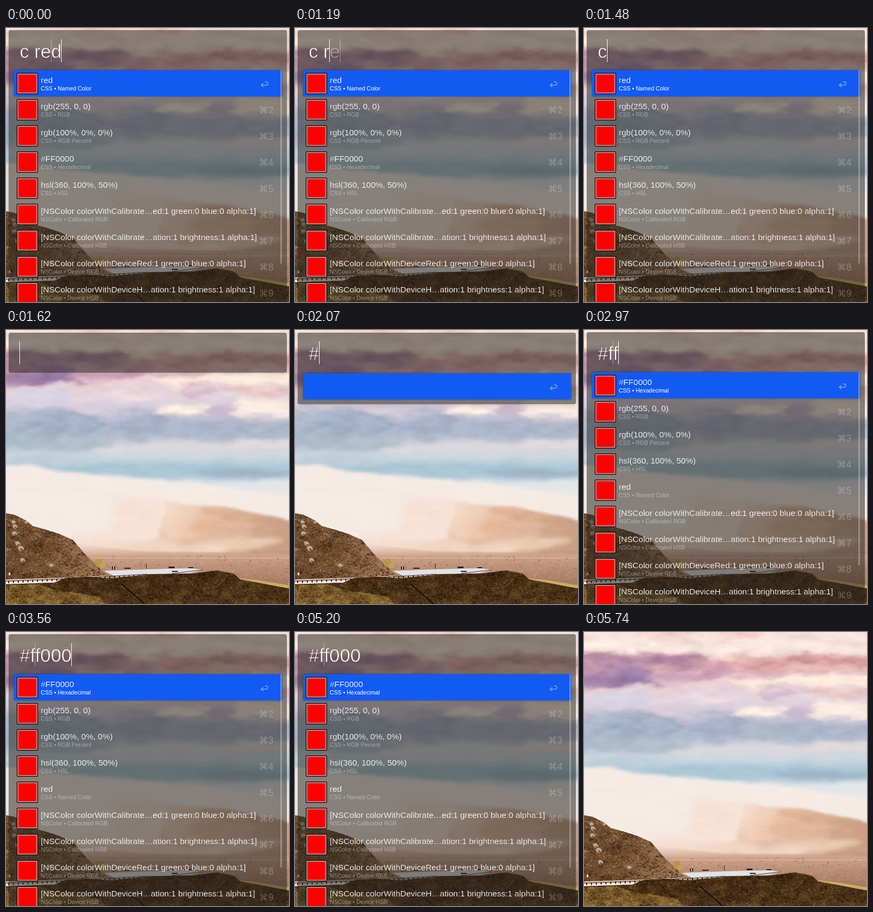
An HTML page with a canvas that plays this animation: 529x513 px, repeating every 5.84 s.

```html
<!DOCTYPE html>
<html lang="en">
<head>
<meta charset="utf-8">
<title>Color search</title>
<style>
html, body { margin: 0; width: 100%; height: 100%; overflow: hidden; background: #f4ebe5; }
canvas { display: block; }
</style>
</head>
<body>
<canvas id="stage" width="529" height="513"></canvas>
<script>
const W = 529, H = 513, LOOP = 5840;
const FONT = '"Liberation Sans", Arial, sans-serif';
const QUERY_X = 25.4, QUERY_SIZE = 35.3;

function layer() {
  const c = document.createElement('canvas');
  c.width = W;
  c.height = H;
  return c.getContext('2d');
}
const ctx = document.getElementById('stage').getContext('2d');
const ink = layer();

// ---------- seeded noise ----------
let seed = 7;
const rnd = () => (seed = (seed * 16807) % 2147483647) / 2147483647;
const between = (a, b) => a + (b - a) * rnd();
const clamp = (v, a, b) => Math.min(b, Math.max(a, v));
const lattice = Float32Array.from({ length: 4096 }, rnd);

function noise(x, y) {
  const i = Math.floor(x), j = Math.floor(y);
  const ease = t => t * t * (3 - 2 * t);
  const u = ease(x - i), v = ease(y - j);
  const at = (a, b) => lattice[(a & 63) + 64 * (b & 63)];
  const mix = row => at(i, row) + (at(i + 1, row) - at(i, row)) * u;
  return mix(j) + (mix(j + 1) - mix(j)) * v;
}
// centred on zero, about -0.5 to 0.5
function fbm(x, y) {
  let sum = 0;
  for (let o = 0, a = 0.53; o < 4; o++, a /= 2) {
    sum += a * (noise(x, y) - 0.5);
    x = x * 2 + 11.3;
    y = y * 2 + 5.7;
  }
  return sum;
}

// ---------- landscape ----------
// Ruffle soft colours into cloud: shift each pixel and shade it by noise.
function ruffle(g) {
  const from = g.getImageData(0, 0, W, H);
  const to = g.createImageData(W, H);
  for (let y = 0; y < H; y++) for (let x = 0; x < W; x++) {
    const reach = y < 180 ? 1 : clamp(1 - (y - 180) / 100, 0.3, 1);
    const sx = clamp(Math.round(x + 60 * reach * fbm(x / 45, y / 22)), 0, W - 1);
    const sy = clamp(Math.round(y + 30 * reach * fbm(x / 50 + 30, y / 24 + 9)), 0, H - 1);
    const s = 4 * (sy * W + sx), d = 4 * (y * W + x);
    const rgb = from.data.subarray(s, s + 3);
    const chroma = Math.max(...rgb) - Math.min(...rgb);
    const shade = chroma * reach * 0.9 * fbm(x / 26 + 17, y / 11 + 40);
    for (let k = 0; k < 3; k++) to.data[d + k] = rgb[k] + shade;
    to.data[d + 3] = 255;
  }
  g.putImageData(to, 0, 0);
}

function paintScene() {
  const g = layer();

  const blend = (x0, y0, x1, y1, stops) => {
    const grad = g.createLinearGradient(x0, y0, x1, y1);
    stops.forEach(([at, color]) => grad.addColorStop(at, color));
    return grad;
  };
  const shape = (points, fill, blur = 0) => {
    g.filter = blur ? `blur(${blur}px)` : 'none';
    g.fillStyle = fill;
    g.beginPath();
    points.split(' ').forEach(p => g.lineTo(...p.split(',')));
    g.fill();
    g.filter = 'none';
  };
  const blob = (x, y, rx, ry, color, alpha = 0.8, tilt = 0) => {
    g.globalAlpha = alpha;
    g.fillStyle = color;
    g.beginPath();
    g.ellipse(x, y, rx, ry, tilt, 0, 7);
    g.fill();
    g.globalAlpha = 1;
  };
  // clustered grain over the shape drawn last; colours run dark to light
  const grain = (n, x0, y0, x1, y1, colors) => {
    g.save();
    g.clip();
    for (let i = 0; i < n; i++) {
      const x = between(x0, x1), y = between(y0, y1);
      const tone = clamp(0.5 + 1.6 * fbm(x / 16, y / 10) + between(-0.4, 0.4), 0, 0.99);
      blob(x, y, between(0.8, 2), between(0.6, 1.3), colors[Math.floor(tone * colors.length)],
        between(0.35, 0.8), between(-0.5, 0.8));
    }
    g.restore();
  };

  g.fillStyle = blend(0, 0, 0, 320, [
    [0, '#f8e6dd'], [0.05, '#f6dfd6'], [0.1, '#f9e7dc'], [0.14, '#eccbc4'],
    [0.18, '#d9aab0'], [0.24, '#deb8c0'], [0.3, '#ead0d2'], [0.4, '#e3d5de'],
    [0.5, '#cdc8d6'], [0.57, '#afb8ca'], [0.63, '#b3bdcd'], [0.68, '#d6d5db'],
    [0.74, '#cdd8df'], [0.8, '#b2cad7'], [0.85, '#b5cbd7'], [0.9, '#e0e5e7'], [1, '#f4ebe5']]);
  g.fillRect(0, 0, W, H);

  g.filter = 'blur(4px)';
  blob(200, 3, 120, 5, '#efc5ba');
  blob(305, 9, 30, 6, '#e6b0ac', 0.7);
  blob(400, 31, 190, 11, '#fbe9df');
  blob(80, 25, 140, 9, '#faebe2', 0.95);
  blob(70, 54, 110, 11, '#ad84a2');
  blob(185, 54, 60, 11, '#a87f9e');
  blob(50, 82, 85, 16, '#9d7ba6');
  blob(95, 92, 50, 11, '#9373a2');
  blob(190, 85, 75, 12, '#c59ab2', 0.7);
  blob(395, 57, 190, 8, '#d79a99');
  blob(440, 70, 110, 6, '#e9b9a8');
  blob(245, 78, 30, 14, '#cf9db1', 0.7);
  blob(320, 98, 48, 9, '#fde8da', 0.95);
  blob(450, 93, 105, 12, '#ffeede', 0.95);
  blob(470, 115, 80, 5, '#ecc0b4');
  blob(350, 115, 32, 8, '#cdb0c8');
  blob(55, 128, 65, 17, '#d8d2e3');
  blob(130, 152, 50, 9, '#dfcfdc');
  blob(235, 126, 35, 8, '#f3e4e8');
  blob(335, 152, 52, 12, '#fff0e3', 0.95);
  blob(490, 145, 75, 19, '#fdeee2', 0.95);
  blob(405, 154, 32, 13, '#cab4cb');
  blob(95, 175, 80, 24, '#a2b0c6');
  blob(20, 180, 50, 24, '#a6b4c8');
  blob(245, 178, 62, 22, '#a3adc6');
  blob(410, 189, 160, 11, '#adb7cb');
  blob(60, 214, 150, 13, '#a7b9ca');
  blob(330, 221, 130, 8, '#dcd9de');
  blob(485, 216, 70, 7, '#e6dcdc');
  blob(195, 225, 30, 5, '#e2dde0');
  blob(70, 240, 110, 7, '#bccfda');
  blob(290, 262, 190, 11, '#a7c6d5');
  blob(445, 268, 92, 8, '#9db2c5', 0.9);
  blob(460, 292, 80, 7, '#e2e7ea');
  g.filter = 'none';

  shape('-20,253 40,253 110,265 200,273 320,283 420,293 550,318 550,530 -20,530', '#f4ebe5', 3);
  shape('200,318 250,314 300,322 310,430 130,430 105,385 200,375', '#f7e2d5', 6);
  shape('296,322 345,327 400,329 450,340 500,351 550,362 550,470 130,470 150,410 285,392',
    blend(300, 320, 420, 450, [[0, '#f5ddcd'], [0.4, '#e9c4ab'], [0.8, '#dcb49c'], [1, '#c79d85']]), 2);
  g.filter = 'blur(5px)';
  blob(430, 350, 70, 10, '#d3a27f', 0.6, 0.2);
  blob(375, 368, 35, 14, '#deb08f', 0.6);
  blob(500, 380, 42, 15, '#d4a68a', 0.6, 0.2);
  blob(430, 402, 90, 12, '#f1d3bf', 0.8, -0.1);
  blob(350, 410, 70, 10, '#f3d8c7', 0.8);
  blob(240, 402, 80, 10, '#f4dacb', 0.7);
  g.filter = 'none';
  ruffle(g);

  shape('120,398 180,406 260,415 400,416 529,420 529,482 150,482',
    blend(0, 400, 0, 470, [[0, 'rgba(215,176,156,0)'], [0.35, '#cba28a'], [1, '#a87a62']]), 1);
  grain(900, 140, 422, W, 475, ['#9a6d55', '#b58670', '#c29a84', '#d0a892']);
  g.fillStyle = 'rgba(236,208,188,.6)';
  g.fillRect(160, 426, W - 160, 1.2);

  // near hill on the left
  shape('0,343 16,346 38,357 50,367 75,374 100,382 125,393 136,406 152,424 175,446 192,462 0,472',
    blend(0, 350, 150, 470, [[0, '#6d4c2f'], [0.5, '#6f4c30'], [1, '#a37a5b']]));
  grain(4200, 0, 343, 192, 470, ['#2e1c0e', '#402a16', '#543a20', '#73512f', '#8f6a48', '#b08a66']);
  [[14, 360, 4], [17, 368, 5], [16, 381, 5], [22, 400, 5], [28, 409, 6], [31, 431, 5], [38, 360, 3], [85, 441, 4]]
    .forEach(([x, y, r]) => {
      blob(x, y, r, r * 0.8, '#cfbeac', 0.8, 0.6);
      blob(x + 2, y + 3, r * 0.7, r * 0.3, '#5b4230', 0.8, 0.6);
    });

  // road and lay-by
  shape('0,467 100,464 185,460 195,463 120,468 0,472', '#dccbba');
  blob(173, 436, 8, 8, '#b39442', 0.75);
  blob(180, 441, 5, 5, '#c7a655', 0.7);
  shape('183,451 235,449 300,447 345,446 370,449 345,455 262,459 205,462', '#dfe3e6');
  g.strokeStyle = '#3a2a20';
  g.lineWidth = 1.2;
  g.beginPath();
  g.moveTo(0, 470);
  g.lineTo(110, 466);
  g.lineTo(265, 457);
  g.moveTo(310, 456);
  g.lineTo(368, 449);
  g.stroke();
  g.fillStyle = '#2b1d14';
  for (let x = 4; x < 265; x += 9) g.fillRect(x, 470 - x * 0.046, 2, 4);
  [[198, 443, 6, 5], [221, 445, 12, 2], [304, 443, 11, 3], [341, 444, 9, 2], [310, 451, 11, 2], [262, 437, 1, 10]]
    .forEach(r => g.fillRect(...r));
  g.fillStyle = '#f3ebe2';
  g.fillRect(200, 444, 2, 3);
  g.fillRect(5, 454, 3, 5);

  // foreground scrub
  shape('430,464 470,468 529,478 529,490 430,474', '#c9ad62');
  shape('0,476 90,473 112,464 150,462 200,465 270,457 350,456 372,453 395,450 425,456 438,467 529,484 529,513 0,513',
    blend(0, 455, 0, H, [[0, '#452c15'], [1, '#553a1f']]));
  grain(7500, 0, 448, W, H, ['#1f1208', '#2b1a0a', '#3a2611', '#4a3117', '#60431f', '#82602f']);
  shape('0,478 60,476 90,486 130,492 175,500 185,513 0,513', '#7a5b2b');
  grain(2200, 0, 476, 185, H, ['#3c2810', '#553c19', '#745728', '#947539', '#b08d49']);
  g.strokeStyle = '#1c1009';
  g.lineWidth = 2.5;
  g.beginPath();
  g.moveTo(216, 475);
  g.lineTo(260, 514);
  g.stroke();
  return g.canvas;
}
const scene = paintScene();

// ---------- lettering ----------
// Fill, then shave the outline so the face looks light.
function write(str, x, y, size, alpha = 1, shave = 0, align = 'left') {
  ink.font = `${size}px ${FONT}`;
  ink.textAlign = align;
  ink.fillStyle = `rgba(255,255,255,${alpha})`;
  ink.fillText(str, x, y);
  if (!shave) return;
  ink.globalCompositeOperation = 'destination-out';
  ink.lineWidth = shave;
  ink.lineJoin = 'round';
  ink.strokeText(str, x, y);
  ink.globalCompositeOperation = 'source-over';
}
function queryEnd(str) {
  ink.font = `${QUERY_SIZE}px ${FONT}`;
  return QUERY_X + ink.measureText(str).width;
}
function caret(after, alpha = 1) {
  ink.fillStyle = `rgba(255,255,255,${alpha})`;
  ink.fillRect(Math.floor(queryEnd(after)), 21, 1, 43);
}

// ---------- window ----------
function panel(y, h) {
  const box = new Path2D();
  box.roundRect(5, y, 520, h, 4);
  const outside = new Path2D(box);
  outside.rect(0, 0, W, H);
  ctx.save();
  ctx.clip(outside, 'evenodd');
  ctx.shadowColor = 'rgba(0,0,0,.25)';
  ctx.shadowBlur = 10;
  ctx.shadowOffsetY = 3;
  ctx.fill(box);
  ctx.restore();
  ctx.fillStyle = 'rgba(37,34,30,.53)';
  ctx.fill(box);
}
function selection(y) {
  ctx.save();
  ctx.shadowColor = 'rgba(0,0,0,.4)';
  ctx.shadowBlur = 3;
  ctx.fillStyle = '#135af3';
  ctx.fillRect(15, y, 501, 49);
  ctx.restore();
  ctx.strokeStyle = 'rgba(255,255,255,.45)';
  ctx.lineWidth = 1.4;
  ctx.stroke(new Path2D(`M484 ${y + 22}h2.5a3 3 0 0 1 0 6H477m4-3.5l-4 3.5 4 3.5`));
}
function swatch(y, color) {
  ctx.fillStyle = '#120c0c';
  ctx.beginPath();
  ctx.roundRect(20, y, 40, 40, 2);
  ctx.fill();
  ctx.fillStyle = '#c4b5b1';
  ctx.fillRect(21.5, y + 1.5, 37, 37);
  ctx.fillStyle = color;
  ctx.fillRect(23, y + 3, 34, 34);
}
function wheel() {
  const hue = ctx.createConicGradient(0, 36, 109);
  for (let i = 0; i <= 6; i++) hue.addColorStop(i / 6, `hsl(${(i * 60 + 30) % 360},95%,58%)`);
  const glow = ctx.createRadialGradient(36, 109, 0, 36, 109, 13);
  glow.addColorStop(0, '#fff');
  glow.addColorStop(1, 'rgba(255,255,255,0)');
  [['#1b1b22', 16], ['#e8e8ec', 14.8], [hue, 12.8], [glow, 12.8]].forEach(([fill, r]) => {
    ctx.fillStyle = fill;
    ctx.beginPath();
    ctx.arc(36, 109, r, 0, 7);
    ctx.fill();
  });
  const line = (color, width, d) => {
    ctx.strokeStyle = color;
    ctx.lineWidth = width;
    ctx.lineCap = 'round';
    ctx.stroke(new Path2D(d));
    ctx.lineCap = 'butt';
  };
  line('#111', 6, 'M37 109L50 96');
  line('#f4f4f6', 3.4, 'M37 109L50 96');
  line('#111', 9, 'M52 94L56 90');
  line('#f4f4f6', 6, 'M53 93L56 90');
  line('#111', 4, 'M46 91L55 100');
}

function listRows(hexFirst, green) {
  const named = [green ? 'yellow' : 'red', 'CSS • Named Color'];
  const hex = [green ? '#FFFF00' : '#FF0000', 'CSS • Hexadecimal'];
  const hsl = [`hsl(${green ? 60 : 360}, 100%, 50%)`, 'CSS • HSL'];
  const g = green ? 1 : 0;
  return [
    hexFirst ? hex : named,
    [`rgb(255, ${g * 255}, 0)`, 'CSS • RGB'],
    [`rgb(100%, ${g * 100}%, 0%)`, 'CSS • RGB Percent'],
    ...(hexFirst ? [hsl, named] : [hex, hsl]),
    [`[NSColor colorWithCalibrate…ed:1 green:${g} blue:0 alpha:1]`, 'NSColor • Calibrated RGB'],
    ['[NSColor colorWithCalibrate…ation:1 brightness:1 alpha:1]', 'NSColor • Calibrated HSB'],
    [`[NSColor colorWithDeviceRed:1 green:${g} blue:0 alpha:1]`, 'NSColor • Device RGB'],
    ['[NSColor colorWithDeviceH…ation:1 brightness:1 alpha:1]', 'NSColor • Device HSB']
  ];
}
function label(title, sub, y, subAlpha) {
  write(title, 65, y + 24, 15.5, 1, 0.2);
  write(sub, 65, y + 38, 10.7, subAlpha);
}

const views = {
  none() {},
  bar() { panel(5, 75); },
  blank() { panel(5, 134); selection(81); },
  action() {
    views.blank();
    wheel();
    label('QV U Color Panel', 'Action this item to open the QV U color panel', 80, 1);
  },
  list(query, green) {
    panel(4, 530);
    selection(79);
    listRows(query[0] === '#', green).forEach(([title, sub], i) => {
      const y = 79 + 49 * i;
      swatch(y + 5, green ? '#ffff00' : '#ff0000');
      label(title, sub, y, i ? 0.42 : 1);
      if (i) write('⌘' + (i + 1), 500, y + 32, 17.5, 0.27, 0, 'right');
    });
    ctx.fillStyle = 'rgba(255,255,255,.33)';
    ctx.fillRect(513, 79, 2.5, 362);
  }
};

// start, view, query, caret shown, text before the faint caret, green on
const steps = [
  [0, 'list', 'c red', 1, 'c re'],
  [450, 'list', 'c red', 0, 'c re'],
  [1050, 'list', 'c re', 1],
  [1190, 'list', 'c r', 1, 'c re'],
  [1330, 'action', 'c ', 1],
  [1480, 'list', 'c', 1],
  [1620, 'bar', '', 1],
  [2070, 'blank', '#', 1],
  [2220, 'action', '#', 1],
  [2670, 'action', '#', 0],
  [2820, 'action', '#f', 1, '#'],
  [2970, 'list', '#ff', 1, '#f'],
  [3120, 'list', '#ff', 1, '#f', 1],
  [3270, 'list', '#ff0', 1, '#f', 1],
  [3420, 'list', '#ff00', 1, '#f'],
  [3560, 'list', '#ff000', 1, '#f'],
  [4160, 'list', '#ff000', 0, '#f'],
  [4600, 'list', '#ff000', 1, '#f'],
  [5200, 'list', '#ff000', 0, '#f'],
  [5740, 'none', '', 0]
];

function draw([, view, query, caretOn, ghost, green]) {
  ctx.drawImage(scene, 0, 0);
  ink.clearRect(0, 0, W, H);
  views[view](query, green);
  write(query, QUERY_X, 56, QUERY_SIZE, 1, 0.75);
  if (ghost) {
    if (ghost.length > query.length)
      write(ghost.slice(query.length), queryEnd(query), 56, QUERY_SIZE, 0.4, 0.75);
    caret(ghost, 0.4);
  }
  if (caretOn) caret(query);
  ctx.drawImage(ink.canvas, 0, 0);
}

const begin = performance.now();
let shown;
function tick() {
  const t = (performance.now() - begin) % LOOP;
  const step = steps.findLast(s => s[0] <= t);
  if (step !== shown) draw(shown = step);
  requestAnimationFrame(tick);
}
tick();
</script>
</body>
</html>
```
